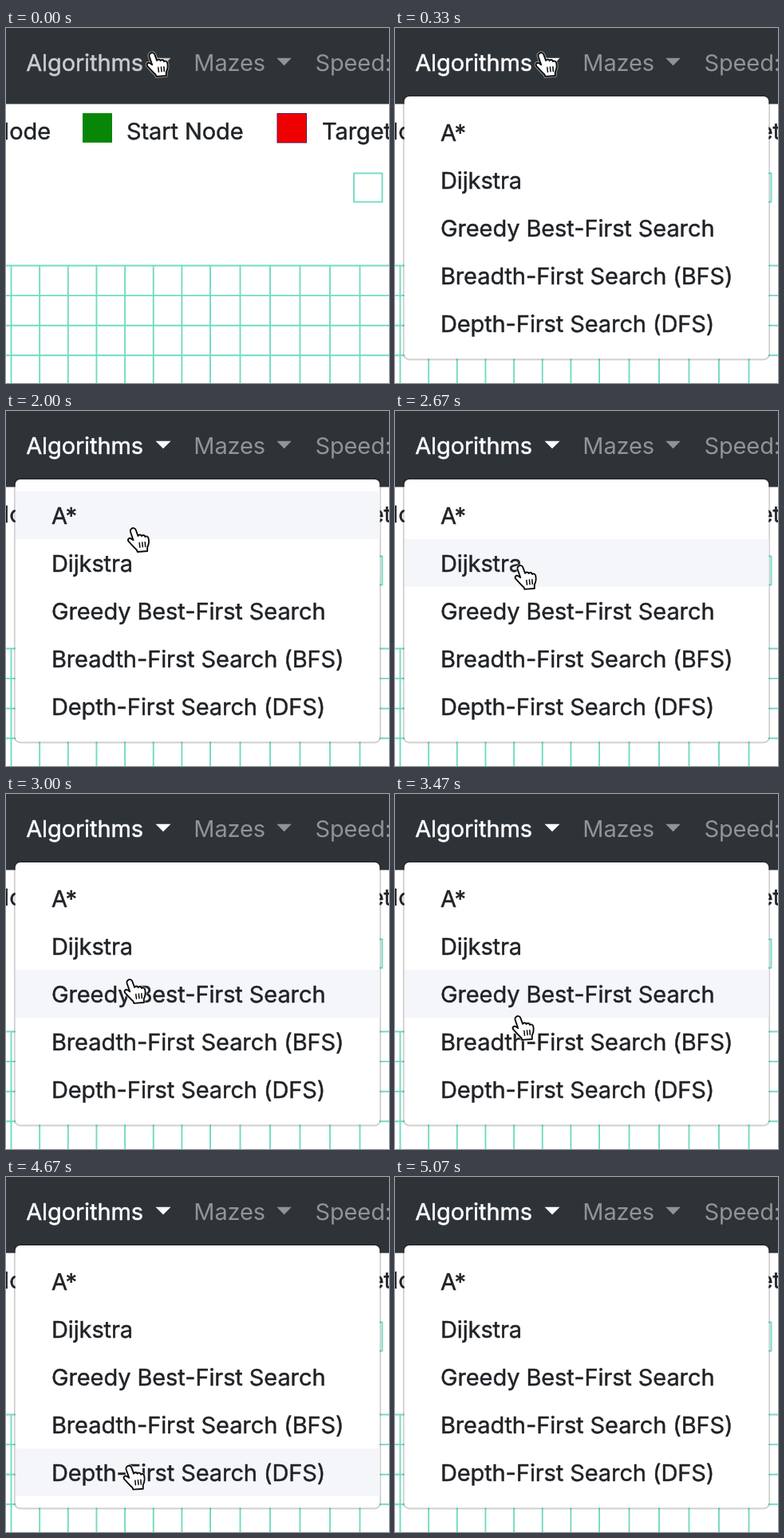
Write an HTML page that moves like this. It is 480 px wide and 446 px high and loops after 5.39 s.

```html
<!DOCTYPE html>
<html lang="en">
<head>
<meta charset="utf-8">
<title>Algorithm menu</title>
<style>
  html, body { margin: 0; width: 100%; height: 100%; overflow: hidden; background: #fff; }
  svg { display: block; width: 480px; height: 446px; }
  text {
    font: 29px Inter, "Liberation Sans", sans-serif;
    letter-spacing: -.1px;
    fill: #1f2226;
    stroke: #1f2226;
    stroke-width: .45;
  }
  .nav text, .nav path { fill: #919497; stroke: none; }
  .nav .active * { fill: inherit; }
  .nav .active text { stroke: inherit; }
  .line { fill: none; stroke: #72dbc3; stroke-width: 1.9; }
</style>
</head>
<body>
<svg viewBox="0 0 480 446">
  <rect width="480" height="446" fill="#fff"/>
  <g class="nav">
    <rect width="480" height="95.5" fill="#2e3337"/>
    <g class="active" id="active">
      <text x="25.2" y="54">Algorithms</text>
      <path d="M187.5 37.8h19l-9.5 9.5z"/>
    </g>
    <text x="235.3" y="54">Mazes</text>
    <path d="M339.3 37.8h18.5l-9.2 9.5z"/>
    <text x="387.4" y="54">Speed:</text>
  </g>
  <text x="-17.5" y="140">Node</text>
  <rect x="96" y="107" width="37" height="37" fill="#078607"/>
  <text x="151" y="140">Start Node</text>
  <rect x="340" y="107.5" width="36.5" height="36.5" fill="#ee0000" stroke="#5c1040"/>
  <text x="396" y="140">Target Node</text>
  <rect class="line" x="436" y="182.5" width="35.5" height="36"/>
  <path class="line" id="grid"/>
  <g id="menu">
    <rect x="11.7" y="86.1" width="456.6" height="329.5" rx="6" fill="#fff"/>
    <rect x="10.8" y="85.2" width="458.4" height="331.3" rx="7" fill="none" stroke="#000" stroke-opacity=".19" stroke-width="1.8"/>
    <rect id="hover" x="12" width="456.5" height="60" fill="#f5f6fa"/>
  </g>
  <g id="hand" stroke-linejoin="round" stroke-linecap="round">
    <path id="palm" fill="#fff" stroke="#0c0c0c" stroke-width="2" d="M-3 1.5C-1-1 2.5 0 3.3 2.5L6.2 10.5C7 8.6 10.2 8.3 11 10.6C12 8.8 15 9 15.6 11.6C17 10.2 19.6 11 20 13.5C21 18 20.3 22 18.5 25.5V30.5L5.5 31.5L4.5 29C1 26-2 22.5-6 18C-8.5 15-5.5 12.5-3 14L0 16L-3.8 5C-4.3 3.4-4 2.3-3 1.5Z"/>
    <path d="M8 19.5l.7 6M11.8 19l.6 6M15.4 18.6l.5 6" fill="none" stroke="#0c0c0c" stroke-width="1.6"/>
  </g>
</svg>
<script>
  const LOOP = 5390, STEP = 1000 / 15;
  const OPEN = 4, LIT = 5, GONE = 76;
  const ROW_TOP = 101, ROW = 60;
  const $ = id => document.getElementById(id);

  const ease = {
    in: p => p * p,
    out: p => p * (2 - p),
    both: p => p * p * (3 - 2 * p)
  };

  // Pointer stops: step, x, y, easing on the way there
  const stops = [
    [0, 184, 31],
    [14, 184, 31, "both"],
    [20, 165, 101, "in"],
    [23, 161, 129, "out"],
    [27, 161, 129, "both"],
    [35, 159, 186, "both"],
    [39, 159, 186, "both"],
    [40, 158, 194, "in"],
    [45, 156, 233, "out"],
    [48, 156, 233, "both"],
    [52, 155, 279, "in"],
    [56, 155, 307, "out"],
    [60, 155, 307, "both"],
    [63, 156, 327, "in"],
    [67, 155, 361, "out"],
    [69, 155, 361, "both"],
    [75, 155, 384, "both"],
    [81, 155, 384, "both"]
  ];

  let grid = "";
  for (let i = 0; i < 13; i++) {
    const x = i < 8 ? 6.5 + 35.65 * i : 256 + 37.5 * (i - 7);
    grid += `M${x} 298.5V446`;
  }
  for (let i = 0; i < 4; i++) grid += `M0 ${298.5 + 37.6 * i}H480`;
  $("grid").setAttribute("d", grid);

  const items = ["A*", "Dijkstra", "Greedy Best-First Search",
    "Breadth-First Search (BFS)", "Depth-First Search (DFS)"];
  items.forEach((label, i) => {
    const text = document.createElementNS("http://www.w3.org/2000/svg", "text");
    text.textContent = label;
    text.setAttribute("x", 56.9);
    text.setAttribute("y", 142 + ROW * i);
    $("menu").append(text);
  });

  // Pale rim that lifts the pointer off the text below it
  const rim = $("palm").cloneNode();
  rim.removeAttribute("id");
  rim.setAttribute("stroke", "#fff");
  rim.setAttribute("stroke-width", 4);
  rim.setAttribute("opacity", .5);
  $("hand").prepend(rim);

  function pointerAt(step) {
    const i = stops.findIndex(s => s[0] > step);
    const [s0, x0, y0] = stops[i - 1], [s1, x1, y1, kind] = stops[i];
    const p = ease[kind]((step - s0) / (s1 - s0));
    return [x0 + (x1 - x0) * p, y0 + (y1 - y0) * p];
  }

  const show = (id, on) => $(id).setAttribute("visibility", on ? "visible" : "hidden");

  function draw(time) {
    const step = Math.floor((time % LOOP + 4) / STEP);
    const [x, y] = pointerAt(step);
    const row = Math.floor((y - ROW_TOP - 1) / ROW);
    const tint = step < LIT ? "#cbcdce" : "#fff";
    show("menu", step >= OPEN);
    show("hand", step < GONE);
    show("hover", step >= OPEN && step < GONE && row >= 0);
    $("hover").setAttribute("y", ROW_TOP + ROW * Math.max(row, 0));
    $("hand").setAttribute("transform", `translate(${x - .8} ${y}) scale(.95)`);
    $("active").setAttribute("fill", tint);
    $("active").setAttribute("stroke", tint);
  }

  const start = performance.now();
  function tick() {
    draw(performance.now() - start);
    requestAnimationFrame(tick);
  }
  tick();
</script>
</body>
</html>
```
